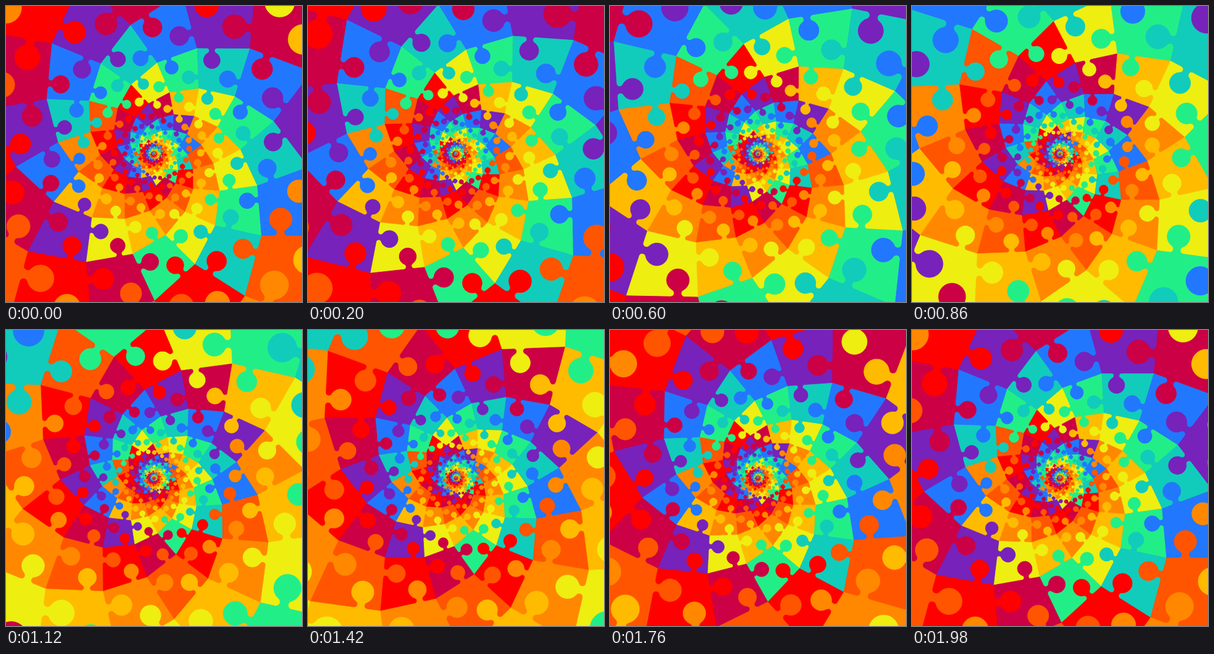
Animation, 480 px wide and 480 px high, one loop 2000 ms. Source, as an HTML page with a canvas:

```html
<!DOCTYPE html>
<html>
<head>
<meta charset="utf-8">
<title>Spiral jigsaw</title>
<style>
html, body { margin: 0; width: 100%; height: 100%; overflow: hidden; }
canvas { display: block; }
</style>
</head>
<body>
<canvas id="stage" width="480" height="480"></canvas>
<script>
const ctx = document.getElementById('stage').getContext('2d');
const TAU = 2 * Math.PI;
const COLORS = ['#f00', '#c04', '#72b', '#27f', '#1cb', '#2e8', '#ee1', '#fb0', '#f80', '#f50'];

// Lattice steps as [log radius, angle]: u goes outward along an arm, and
// 8u + 5v is one full turn, so ten steps of u zoom by 4.
const u = [Math.LN2 / 5, 0.09 * TAU];
const v = [-8 * u[0] / 5, (TAU - 8 * u[1]) / 5];
const w = [v[0] - u[0], v[1] - u[1]];
const ARMS = 5, FIRST = -10, LAST = 56;
const START = [Math.log(476.4), 72.2 * TAU / 360];

const point = (a, b) => {
  const r = Math.exp(a * v[0] + b * w[0]);
  const t = a * v[1] + b * w[1];
  return [r * Math.cos(t), -r * Math.sin(t)];
};

// Straight side from a to b with a round tab at fraction f.
function side(path, a, b, f, size) {
  const dx = b[0] - a[0], dy = b[1] - a[1];
  const turn = Math.atan2(dy, dx), c = Math.cos(turn), s = Math.sin(turn);
  const R = 0.0585 * size, h = 0.0855 * size, fillet = 0.018 * size;
  const half = Math.sqrt((R + fillet) ** 2 - (h - fillet) ** 2);
  const tilt = Math.atan2(h - fillet, half);
  const arc = (x, y, r, from, to, ccw) => path.arc(
    a[0] + f * dx + x * c - y * s,
    a[1] + f * dy + x * s + y * c,
    r, from + turn, to + turn, ccw);
  arc(-half, fillet, fillet, -Math.PI / 2, tilt, false);
  arc(0, h, R, Math.PI + tilt, -tilt, true);
  arc(half, fillet, fillet, Math.PI - tilt, 1.5 * Math.PI, false);
  path.lineTo(...b);
}

// One piece with its outer corner at (1, 0); all others are similar to it.
const piece = new Path2D();
const left = point(1, 0), inner = point(1, 1), right = point(0, 1);
piece.moveTo(1, 0);
piece.lineTo(...left);
side(piece, left, inner, 0.72, Math.exp(v[0]));
side(piece, inner, right, 0.28, Math.exp(w[0]));
piece.closePath();

function draw(p) {
  ctx.setTransform(1, 0, 0, 1, 0, 0);
  ctx.fillStyle = COLORS[1];
  ctx.fillRect(0, 0, 480, 480);
  const zoom = START[0] + p * 10 * u[0];
  const spin = START[1] + p * (10 * u[1] - TAU);
  // Inner pieces first, so that tabs lie on top of them.
  for (let m = LAST; m >= FIRST; m--) {
    for (let arm = ARMS - 1; arm >= 0; arm--) {
      const r = Math.exp(zoom + arm * v[0] - m * u[0]);
      if (r < 0.7 || r > 900) continue;
      const t = spin + arm * v[1] - m * u[1];
      const c = r * Math.cos(t), s = r * Math.sin(t);
      ctx.setTransform(c, -s, s, c, 240, 240);
      ctx.fillStyle = ctx.strokeStyle = COLORS[(arm + m + 10) % 10];
      ctx.lineWidth = Math.min(0.7 / r, 0.01);
      ctx.fill(piece);
      ctx.stroke(piece);
    }
  }
}

function tick() {
  draw(Math.floor(performance.now() % 2000 / 20) / 100);
  requestAnimationFrame(tick);
}
tick();
</script>
</body>
</html>
```
